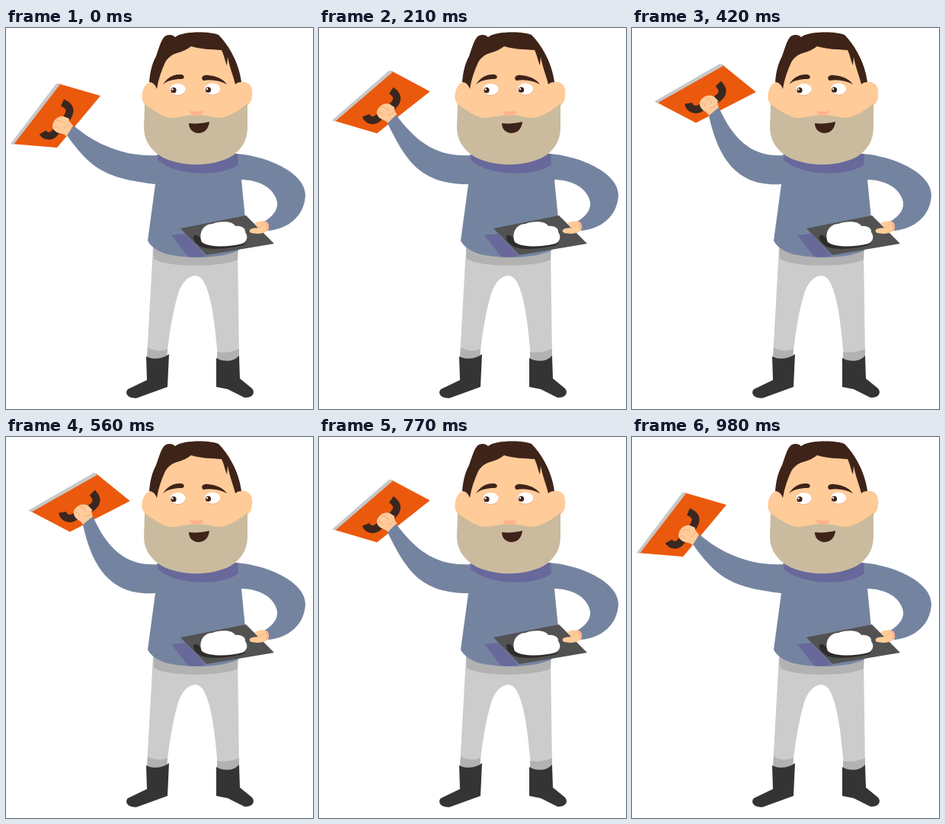
Recreate the animation shown at these times as an HTML page with a canvas. Size 403 px wide and 500 px high, loop 1050 ms.

```html
<!DOCTYPE html>
<html lang="en">
<head>
<meta charset="utf-8">
<title>Plasterer</title>
<style>
html, body { margin: 0; width: 100%; height: 100%; overflow: hidden; background: #fff; }
canvas { display: block; width: 403px; height: 500px; }
</style>
</head>
<body>
<canvas id="stage" width="403" height="500"></canvas>
<script>
const ctx = document.getElementById('stage').getContext('2d');
const C = {
  skin: '#ffcb99', blush: '#ffb38d', line: '#f3ad80', hair: '#3e2318', beard: '#cabb9e',
  sweater: '#7484a0', shade: '#68689b', pants: '#cccccc', band: '#b2b2b2',
  boot: '#343434', board: '#525252', dark: '#302c2b', grip: '#3a2720',
  orange: '#eb590d', steel: '#c8c8c8'
};

function fill(color, d) {
  ctx.fillStyle = color;
  ctx.fill(new Path2D(d));
}

function stroke(color, width, d) {
  ctx.strokeStyle = color;
  ctx.lineWidth = width;
  ctx.stroke(new Path2D(d));
}

function ellipse(color, x, y, rx, ry) {
  ctx.fillStyle = color;
  ctx.beginPath();
  ctx.ellipse(x, y, rx, ry, 0, 0, 2 * Math.PI);
  ctx.fill();
}

function drawLegs() {
  fill(C.pants, 'M193 288 L304 288 L306 432 L278 432 C275 398 272 366 264 343 C260 331 255 325 248 325 C237 326 229 337 225 352 C218 377 214 404 211 432 L185 432 Z');
  fill(C.band, 'M193 286 L305 286 L304 304 C284 314 214 315 194 303 Z');
  fill(C.band, 'M186 419 C194 424 204 425 212 421 L211 437 L185 437 Z');
  fill(C.band, 'M277 425 C287 427 298 425 306 421 L306 440 L277 440 Z');
  fill(C.boot, 'M184 431 C194 436 206 434 214 428 L212 471 L172 485.5 C160 487 155 479 160 474 L185 462 Z');
  fill(C.boot, 'M276 433 C286 439 299 438 306 430 L307 460 L323 473 C328 479 323 486 313 485 L291 474 L276 471 Z');
}

function drawTorso() {
  fill(C.sweater, 'M198 166 L305 165 L309 199 L314 250 L305 292 C280 303 240 303 212 297 C199 293 190 287 186 279 L196 205 Z');
  fill(C.sweater, 'M303 165 C348 169 393 192 393 219 C392 247 370 264 344 266 L339 254 C352 246 359 236 355 225 C349 207 328 199 308 199 Z');
  fill(C.shade, 'M200 166 L304 165 L305 179 C286 195 224 196 199 173 Z');
  fill(C.shade, 'M217 272 L235 270 L262 299 C253 301 246 301 239 300 Z');
}

function drawBoard() {
  fill(C.board, 'M229 263 L315 246 L352 283 L263 298 Z');
  fill(C.dark, 'M246 273 C251 268 257 279 262 283 C280 288 300 284 315 282 L311 285 C292 290 266 292 256 287 C249 283 245 278 246 273 Z');
  fill('#fff', 'M257 281 C252 268 260 257 271 257 C280 253 298 253 301 260 C309 259 315 263 314 268 C318 273 317 280 310 283 C292 288 266 288 257 281 Z');
  fill(C.skin, 'M320 265 C322 262 328 263 331 262 L326 256 C332 253 339 252 343 255 C346 259 346 264 342 267 C336 271 326 270 322 269 C320 268 319 267 320 265 Z');
  fill(C.blush, 'M339 254 L343 255 C346 259 346 264 342 267 C343 262 342 258 339 254 Z');
  stroke(C.line, 1, 'M331 262 C335 261 337 259 338 257');
}

function drawEye(x, y) {
  ellipse(C.line, x, y + .7, 10.2, 7.7);
  ellipse('#fff', x, y, 10.2, 7.4);
  ellipse(C.hair, x - 5.5, y + 1.2, 3.6, 3.6);
  ellipse('#fff', x - 7, y, 1.2, 1.2);
}

function drawHead() {
  fill(C.skin, 'M191 71 C180 71 176 90 180 97 C182 103 188 104 192 112 L218 125 L285 125 L312 108 C316 100 322 101 323 90 C325 77 319 69 308 71 L292 24 L220 20 Z');
  fill(C.beard, 'M182 100 C195 109 209 119 219 118 C231 117 239 114 250 114 C263 114 272 118 283 118 C297 114 308 107 317 99 L317 130 C317 146 311 156 301 165 C277 184 221 184 197 164 C187 155 181 145 181 130 Z');
  fill(C.blush, 'M241 108 C246 110 254 110 259 108 C259 114 255 115 250 115 C245 115 242 113 241 108 Z');
  fill(C.hair, 'M240 125 C249 126 259 125 267 123 C266 133 260 138 252 138 C244 137 240 132 240 125 Z');
  fill(C.hair, 'M198 80 C196 74 192 71 188 71 C189 57 192 46 197 37 C201 26 204 13 210 10 C215 8 219 9 222 12 C231 4 268 4 279 9 C291 21 306 45 309 71 C305 71 303 72 301 74 C299 64 294 54 291 38 L290 49 C288 45 287 38 283 29 C270 28 255 28 243 24 C238 28 232 31 224 33 C218 35 213 38 209 45 C204 56 200 67 198 80 Z');
  drawEye(225.5, 80.5);
  drawEye(271, 80);
  fill(C.hair, 'M206 74 C211 66 219 60 230 61 C235 62 235 67 230 67 C220 67 212 69 206 74 Z');
  fill(C.hair, 'M259 69 C255 66 258 61 265 62 C277 63 285 67 290 74 C281 69 270 67 259 69 Z');
}

function drawTrowel() {
  fill(C.orange, 'M69 73 L124 89 L67 157 L7 152 Z');
  fill(C.steel, 'M66 73 L71 74 L10 153 L6 152 Z');
  stroke(C.grip, 10, 'M74 98 C88 104 85 113 75 124 L66 135 C60 145 51 142 48 137');
  fill(C.skin, 'M61 129 C62 120 69 115 76 116 L83 119 C82 123 86 125 88 128 L80 143 C77 138 72 139 67 137 C63 135 61 132 61 129 Z');
  stroke(C.line, 1, 'M66 122 C70 121 74 122 76 125 M63 130 C66 129 69 130 70 133 M76 131 C80 130 82 128 82 125');
}

// Each value is given for the low, middle and high arm pose.
const hand = { x: [74, 88.6, 101.2], y: [129, 112.2, 101.5], turn: [0, 11.7, 22.9] };
const cuffTop = [[89, 101, 114], [128, 114, 104]];
const topA = [[110, 127, 133], [147, 148, 147]];
const topB = [[150, 153, 158], [170, 170, 170]];
const lowB = [[130, 133, 138], [197, 205, 209]];
const lowA = [[112, 114, 113], [185, 174, 171]];
const cuffLow = [[80, 90, 101], [141, 125, 115]];

const blend = ([a, b, c], t) => a + t * (b - a) + t * (t - 1) / 2 * (a - 2 * b + c);

function drawRaisedArm(t) {
  const at = p => p.map(v => blend(v, t));
  ctx.save();
  ctx.translate(blend(hand.x, t), blend(hand.y, t));
  ctx.rotate(blend(hand.turn, t) * Math.PI / 180);
  ctx.translate(-hand.x[0], -hand.y[0]);
  drawTrowel();
  ctx.restore();

  ctx.fillStyle = C.sweater;
  ctx.beginPath();
  ctx.moveTo(...at(cuffTop));
  ctx.bezierCurveTo(...at(topA), ...at(topB), 200, 167);
  ctx.lineTo(203, 205);
  ctx.lineTo(196, 205);
  ctx.bezierCurveTo(...at(lowB), ...at(lowA), ...at(cuffLow));
  ctx.fill();
}

const STEP = 70, COUNT = 15, PEAK = 7;
const lift = [0, .43, .73, 1, 1.34, 1.67, 2, 2.33];

function draw(now) {
  const step = Math.floor(now / STEP) % COUNT;
  ctx.fillStyle = '#fff';
  ctx.fillRect(0, 0, 403, 500);
  drawLegs();
  drawRaisedArm(lift[PEAK - Math.abs(PEAK - step)]);
  drawTorso();
  drawBoard();
  drawHead();
  requestAnimationFrame(draw);
}

draw(0);
</script>
</body>
</html>
```
